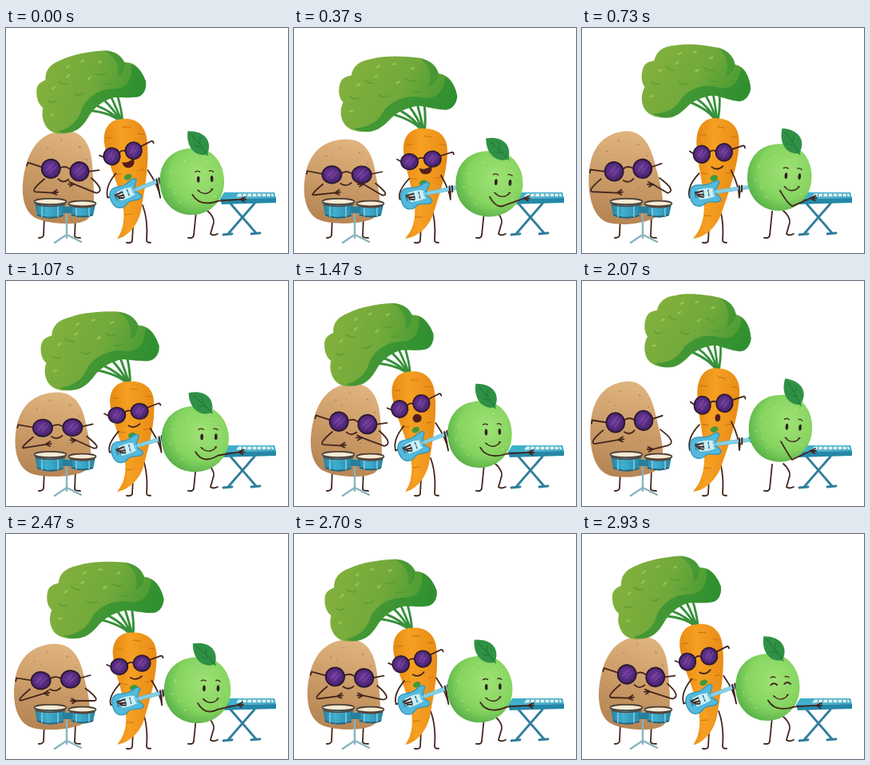
Write an HTML page that moves like this. It is 353 px wide and 282 px high and loops after 2960 ms.

```html
<!DOCTYPE html>
<html lang="en">
<head>
<meta charset="utf-8">
<title>Veggie band</title>
<style>
html, body { margin: 0; width: 100%; height: 100%; overflow: hidden; background: #fff; }
svg { display: block; width: 100vw; height: 100vh; }
.line { fill: none; stroke: #43251d; stroke-width: 1.8; stroke-linecap: round; stroke-linejoin: round; }
.stand { fill: none; stroke: #2f7d9c; stroke-width: 2.8; stroke-linecap: round; }
</style>
</head>
<body>
<svg viewBox="0 0 353 282" preserveAspectRatio="none">
  <defs>
    <linearGradient id="potatoSkin" x1=".6" y1="0" x2=".4" y2="1">
      <stop offset="0" stop-color="#e0b47f"/><stop offset=".5" stop-color="#cb9c68"/><stop offset="1" stop-color="#b58453"/>
    </linearGradient>
    <linearGradient id="carrotSkin">
      <stop offset="0" stop-color="#e68a14"/><stop offset=".4" stop-color="#f6a022"/><stop offset="1" stop-color="#e88c16"/>
    </linearGradient>
    <linearGradient id="crownGreen" x1="0" y1=".4" x2="1" y2=".7">
      <stop offset="0" stop-color="#83b03d"/><stop offset=".5" stop-color="#70a93b"/><stop offset="1" stop-color="#37952f"/>
    </linearGradient>
    <radialGradient id="appleSkin" cx=".6" cy=".4" r=".65">
      <stop offset="0" stop-color="#9fe276"/><stop offset=".65" stop-color="#86d460"/><stop offset="1" stop-color="#58b148"/>
    </radialGradient>
    <linearGradient id="drumSide">
      <stop offset="0" stop-color="#237f9f"/><stop offset=".4" stop-color="#3fb0d0"/><stop offset="1" stop-color="#2583a5"/>
    </linearGradient>
    <radialGradient id="lensTint" cx=".45" cy=".45" r=".6">
      <stop offset="0" stop-color="#6f3b9c"/><stop offset="1" stop-color="#421f68"/>
    </radialGradient>
    <g id="lens">
      <circle r="11.6" fill="url(#lensTint)" stroke="#2b1730" stroke-width="1.8"/>
      <path d="M-6 3L3 -7M-2 6L7 -4" stroke="#9160b4" stroke-width="1.5" opacity=".4"/>
    </g>
    <g id="hand"><path class="line" d="M0 0L6 -3M0 0L7 0M0 0L5 3"/></g>
  </defs>

  <path class="line" d="M48 236L47 260Q46 263 41 263M87 236L86 261Q87 263 93 263"/>
  <g id="potato">
    <path d="M66 131C86 130 97 146 101 170C105 196 112 222 102 236C92 247 46 248 32 239C15 228 14 198 18 177C23 150 38 132 66 131Z" fill="url(#potatoSkin)"/>
    <path d="M42 153l2 1M82 148l2 2M92 163l2 1M34 216l2 1M58 142l2 0M50 158l1 1M78 202l2 1" stroke="#ae7f4e" stroke-width="1.2"/>
    <path class="line" d="M60 191Q67 196 73 190"/>
    <path class="line" d="M38 178L20 174L19 178M97 178L110 175M61 177Q67 173 73 177"/>
    <use href="#lens" x="49.5" y="179"/><use href="#lens" x="85.5" y="179"/>
  </g>
  <path d="M76 234V263M76 259L61 269M76 259L94 268" fill="none" stroke="#86b4bf" stroke-width="2.4" stroke-linecap="round"/>
  <g>
    <path d="M36 218L39 235Q54 242 71 236L75 218Z" fill="url(#drumSide)"/>
    <path d="M79 221L82 235Q97 240 109 235L112 221Z" fill="url(#drumSide)"/>
    <path d="M71 224h12v8h-12z" fill="#277f9e"/>
    <path d="M39 234Q54 241 72 235M82 234Q97 239 109 234" fill="none" stroke="#2b5f72" stroke-width="1.8"/>
    <path d="M45 222v15M65 222v15M88 224v12M104 224v12" stroke="#a5dcea" stroke-width="1.2"/>
    <g fill="#f7ead4" stroke="#4c4038" stroke-width="1.6">
      <ellipse cx="55.5" cy="217.5" rx="20" ry="3.6"/><ellipse cx="95.5" cy="220" rx="17" ry="3.4"/>
    </g>
    <path d="M37 221Q55 226 74 221M81 223Q96 227 111 223" fill="none" stroke="#5d4238" stroke-width="1.3"/>
  </g>
  <path id="potatoArms" class="line"/>
  <use id="potatoLeft" href="#hand"/><use id="potatoRight" href="#hand"/>

  <path class="line" d="M160 228L158 267Q157 270 151 269M171 222Q178 240 176 266Q176 269 181 269"/>
  <g id="carrot">
    <g id="crown">
      <path d="M156 121Q146 108 116 101M156 121Q146 106 126 96M156 120Q149 104 137 90M157 120Q153 105 147 87M158 120Q159 106 156 88" fill="none" stroke="#37903a" stroke-width="3"/>
      <path d="M49 70C50 60 56 58 63 56C64 44 72 37 86 34C104 28 128 28 146 29C160 31 168 38 171 47C184 48 192 58 196 74C196 86 188 93 180 92C166 92 158 89 148 89C134 92 124 98 116 106C108 116 100 124 88 125C74 127 60 124 55 112C52 104 52 98 55 90C50 86 48 78 49 70Z" fill="url(#crownGreen)"/>
      <path d="M70 122Q98 119 107 96Q124 76 150 78Q178 83 180 50Q192 58 196 74C196 86 188 93 180 92C166 92 158 89 148 89C134 92 124 98 116 106C108 116 100 124 88 125Q78 126 70 122Z" fill="#238a2f" opacity=".6"/>
      <path d="M146 29C160 31 168 38 171 47Q170 60 160 64Q166 42 146 29Z" fill="#2b8d31" opacity=".45"/>
      <path d="M79 60q5 5 12 4M130 56q7 5 14 1M99 78q6 5 13 0M63 82q5 5 11 1M140 70q6 4 12 0" fill="none" stroke="#46922f" stroke-width="1.6" opacity=".55"/>
      <path d="M94 44l3 -2M114 39l3 -1M137 43l3 -1M71 68l3 -2M120 62l3 -2M92 56l3 -2M64 101l3 -1" stroke="#a3cf55" stroke-width="2.5" stroke-linecap="round" opacity=".7"/>
    </g>
    <path d="M157 117C143 116 132 126 133 146C135 172 150 205 150 230C150 246 145 257 139 264C153 262 166 250 172 232C180 202 188 172 187 146C187 127 175 116 157 117Z" fill="url(#carrotSkin)"/>
    <path d="M137 139h7M176 137l8 1M174 182l6 -1M143 184l8 1M160 217l9 -1M151 235l8 0M168 203l7 -1M158 127l9 1" stroke="#d2760f" stroke-width="1.2" stroke-linecap="round"/>
    <ellipse cx="159" cy="189" rx="5" ry="3.5" fill="#43983c" transform="rotate(-18 159 189)"/>
    <g transform="translate(155 159.5) rotate(-9.5)">
      <path class="line" d="M-25 -2L-29 -5M25 -3L39 -6Q41 -6 41 -3M-4 -2Q0 -5 4 -2"/>
      <use href="#lens" transform="translate(-14.2) scale(.9)"/><use href="#lens" transform="translate(14.2) scale(.9)"/>
    </g>
    <path id="smile" class="line" d="M155 176Q162 181 169 174"/>
    <path id="laugh" d="M154 171Q161 173 168 167Q169 176 162 177Q156 178 154 171Z" fill="#5a1c1c" stroke="#43251d" stroke-width="1.3"/>
    <ellipse id="sing" cx="162" cy="175" fill="#5a1c1c" stroke="#43251d" stroke-width="1.3"/>
  </g>
  <path id="carrotArms" class="line"/>
  <g id="guitar">
    <path d="M6 -2.3H51V2.3H6Z" fill="#5fbfdc"/>
    <path d="M48 -3L53 -5L64 -5Q66 1 62 4.5L50 4Z" fill="#2d9cc2"/>
    <path d="M53 -5v-3M56.500 -5v-3M60 -5v-3M63.500 -5v-3" stroke="#286b88" stroke-width="1.4"/>
    <path d="M-17 -8C-12 -14 -4 -8 3 -10C8 -11 13 -15 16 -11C16 -8 10 -4 10 0C10 4 16 6 15 10C11 15 3 8 -3 11C-9 16 -17 14 -19 6C-20 1 -20 -4 -17 -8Z" fill="#54b9da" stroke="#2f93b8" stroke-width="1.1"/>
    <path d="M-10 -5Q2 -7 8 -4Q5 0 9 5Q0 7 -9 6Z" fill="#cdeff6"/>
    <path d="M-13 -4V4M-4 -4V4M2 -4V4" stroke="#277591" stroke-width="1.4"/>
    <path d="M-13 -.8H61M-13 .8H61" stroke="#d9f2f5" stroke-width=".5"/>
    <path class="line" d="M-13 -2L-5 -3M-12 0L-4 1M-10 2L-5 4M37 4L38 -3M40 4L41 -3"/>
  </g>

  <path class="line" d="M238 230L235 260Q234 264 228 263M252 229Q261 237 260 244L256 258Q259 261 265 258"/>
  <path class="stand" d="M281 220L313 257M311 220L278 258M272 259L283 258M307 258L318 257"/>
  <path d="M273 206H336L338 213L268 214Z" fill="#3fb0cc"/>
  <path d="M291 207.500H334L335.500 211L288 211.500Z" fill="#d9f1f5"/>
  <path d="M296 207.500l-1 4M302 207.500l-1 4M308 207.500v4M314 207.500v4M320 207.500v4M326 207.500v4M331 207.500l1 4" stroke="#3a7f96"/>
  <path d="M268 214L338 213V219L270 221Z" fill="#2488a8"/>
  <g id="apple">
    <path d="M0 -40C24 -43 41 -23 41 0C41 24 23 41 0 41C-23 41 -40 24 -40 0C-40 -24 -24 -39 0 -40Z" fill="url(#appleSkin)"/>
    <path d="M-27 -11l1 1M-22 14l1 1M-9 -25l1 1M-15 25l1 1M18 -25l1 1M29 18l1 1M-30 6l1 1" stroke="#b8e991" stroke-width="1.6"/>
    <g transform="translate(2.500 2)">
      <path class="line" d="M6 10Q15 17 23 9M5 9l2 1M22 8l2 0M2 -13Q5 -15 8 -13M20 -14Q23 -15 25 -13" style="stroke-width:1.3"/>
      <g id="openEyes" fill="#30231d"><ellipse cx="6" cy="-4" rx="1.8" ry="3.8"/><ellipse cx="23" cy="-4.500" rx="1.8" ry="3.8"/></g>
      <path id="closedEyes" class="line" d="M2 -4Q6 -8 10 -4M19 -5Q23 -9 27 -5"/>
    </g>
  </g>
  <g id="leaf">
    <path d="M0 1C-14 -5 -16 -23 -2 -37C14 -26 17 -9 0 1Z" fill="#2f9145"/>
    <path d="M0 3Q1 -13 -1 -31M0 -10L-6 -17M0 -15L6 -22" fill="none" stroke="#23793a" stroke-width="1.1"/>
  </g>
  <path id="appleArm" class="line"/><use id="appleHand" href="#hand"/>
</svg>
<script>
const LOOP = 2960, SWAY = LOOP / 2, STEP = 100 / 3, TAU = Math.PI * 2;
const el = id => document.getElementById(id);
const set = (id, name, value) => el(id).setAttribute(name, value);
const move = (id, value) => set(id, 'transform', value);
const show = (id, on) => set(id, 'visibility', on ? 'visible' : 'hidden');
const wave = (phase, peak) => Math.cos(TAU * (phase - peak));

// 0 at the top of a bounce, 1 at the bottom: slow sink, quick rise.
function bounce(phase) {
  const p = (phase + 0.2) % 1;
  const u = p < 0.68 ? p / 0.68 : (1 - p) / 0.32;
  return (u + (1 - Math.cos(Math.PI * u)) / 2) / 2;
}

function pivot(x, y, angle, sx, sy) {
  return `translate(${x} ${y}) rotate(${angle}) scale(${sx} ${sy}) translate(${-x} ${-y})`;
}

function drawPotato(sway, dip, beat) {
  move('potato', `translate(${-1.5 - sway * 1.8} 0) ` +
    pivot(68, 243, -sway * 5.5, 0.98 + dip * 0.06, 1.05 - dip * 0.13));
  const hit = wave(beat * 2, 1.56);
  const left = { x: 51 - 7 * sway, y: 203 - 4 * hit };
  const right = { x: 87 + 2 * sway, y: 203 + 8 * hit };
  const dy = dip * 9;
  set('potatoArms', 'd',
    `M${36 - 12 * sway} ${187 + dy}Q${18 - 12 * sway} ${202 + dy} ${25 - 12 * sway} ${204 + dy * 0.6}L${left.x} ${left.y}` +
    `M${102 - 5 * sway} ${186 + dy}Q${122 - 3 * sway} ${202 + dy} ${110 - 3 * sway} ${206 + dy * 0.4}L${right.x} ${right.y}`);
  move('potatoLeft', `translate(${left.x} ${left.y}) rotate(-8)`);
  move('potatoRight', `translate(${right.x} ${right.y}) scale(-1 1)`);
}

function drawCarrot(sway, dip, time) {
  const stretch = 1.055 - dip * 0.12 + sway * 0.012;
  const girth = 0.98 + dip * 0.04;
  move('carrot', pivot(142, 262, sway * 5.3, girth, stretch));
  move('crown', pivot(156, 117, sway * 3, 0.93 + dip * 0.06, 1 / stretch));

  const tilt = -14.5 + 7 * sway, gx = 153.5 + 3 * sway, gy = 206 + 4 * dip;
  move('guitar', `translate(${gx} ${gy}) rotate(${tilt}) scale(1.09)`);
  const rad = tilt * Math.PI / 180;
  const hx = gx + 42 * Math.cos(rad), hy = gy + 42 * Math.sin(rad) + 3;
  const sy = 176 + dip * 9;
  set('carrotArms', 'd',
    `M${142 + 5 * sway} ${sy + 4}Q${127 + 4 * sway} ${sy + 21} ${131 + 4 * sway} ${212 + dip * 3}L${gx - 10} ${gy}` +
    `M${182 + 5 * sway} ${sy}Q${194 + 3 * sway} ${sy + 20} ${195 + 2 * sway} ${212 + dip * 3}L${hx} ${hy}`);

  const laughing = time < 450;
  const singing = time >= 1250 && time < 2180;
  const wide = time < 1720;
  show('laugh', laughing);
  show('sing', singing);
  show('smile', !laughing && !singing);
  set('sing', 'rx', wide ? 5 : 2.8);
  set('sing', 'ry', wide ? 4.5 : 3.8);
}

function drawApple(sway, dip, time) {
  const x = 239.5 + 8.5 * sway, y = 187 + 9.5 * dip - 3 * sway;
  const wide = 0.98 + dip * 0.06, tall = 1.04 - dip * 0.02;
  move('apple', `translate(${x} ${y}) rotate(${2 + 3 * sway}) scale(${wide} ${tall})`);
  const stem = (34 + 6 * sway) * Math.PI / 180;
  move('leaf', `translate(${x + 39 * Math.sin(stem)} ${y - 39 * Math.cos(stem)}) rotate(${-30 - 16 * dip + 3 * sway})`);
  const handX = 290 - 4 * sway, handY = 214 - sway;
  set('appleArm', 'd', `M${x + 1} ${y + 17}Q${x + 10} ${y + 33} ${265 - sway * 2} ${220 + sway * 4}L${handX} ${handY}`);
  move('appleHand', `translate(${handX} ${handY})`);
  const blink = time > 2760;
  show('openEyes', !blink);
  show('closedEyes', blink);
}

function render(now) {
  const time = Math.floor((now % LOOP + 4) / STEP) * STEP % LOOP;
  const phase = time / SWAY % 1, beat = phase * 2 % 1, dip = bounce(beat);
  drawPotato(wave(phase, 0.5), dip, beat);
  drawCarrot(wave(phase, 0.43), dip, time);
  drawApple(wave(phase, 0.41), dip, time);
}

const start = performance.now();
function tick() {
  render(performance.now() - start);
  requestAnimationFrame(tick);
}
tick();
</script>
</body>
</html>
```
